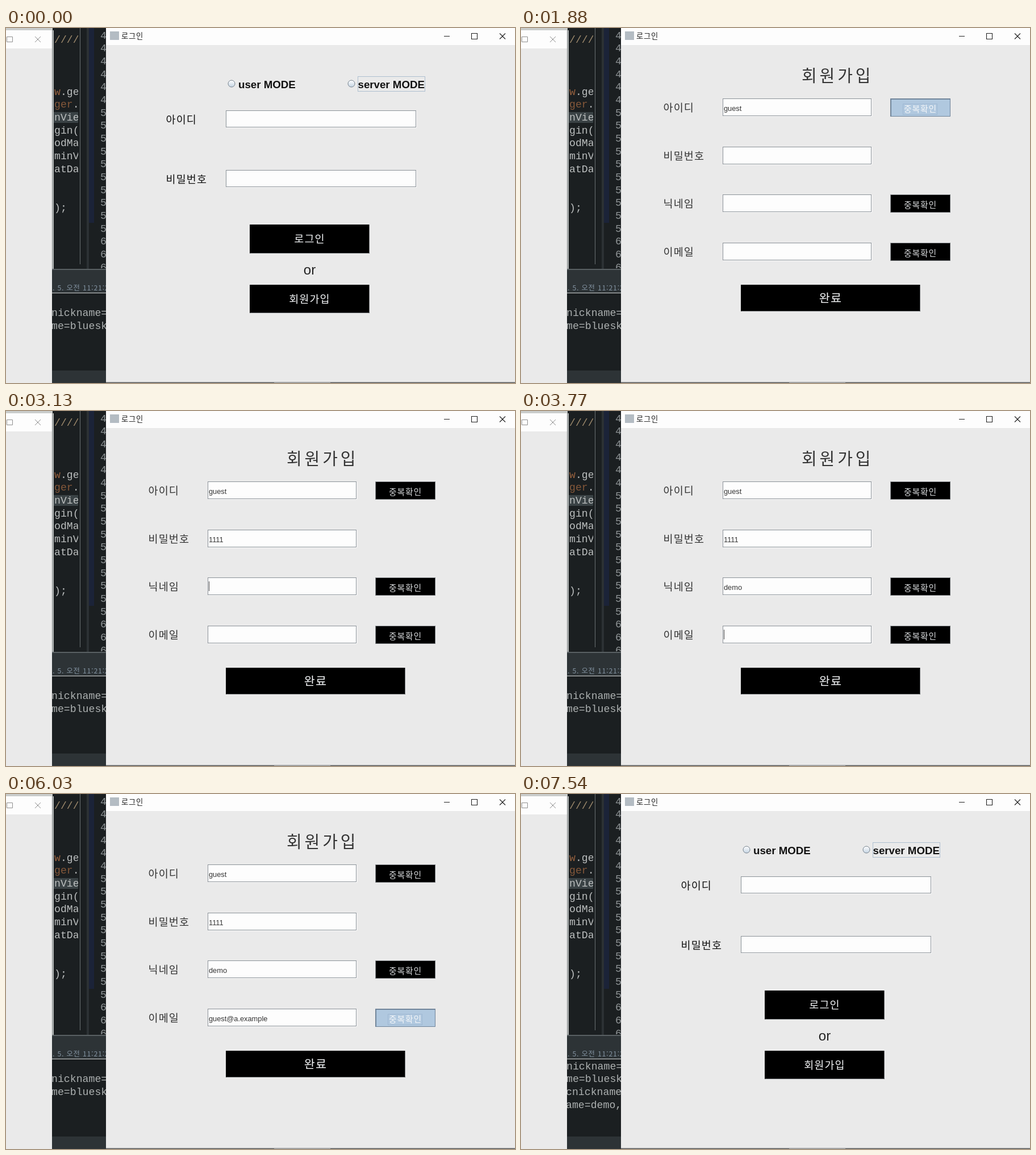
Write an HTML page that moves like this. It is 896 by 625 pixels and loops after 7730 ms.

```html
<!DOCTYPE html>
<html lang="ko">
<head>
<meta charset="utf-8">
<title>로그인</title>
<style>
  html, body { margin: 0; width: 100%; height: 100%; overflow: hidden; background: #1b1f21; }
  svg { display: block; width: 896px; height: 625px; }
  text { white-space: pre; }
  .ko { font-family: "Noto Sans CJK KR", "Noto Sans CJK", "Noto Sans CJK JP", sans-serif; letter-spacing: .06em; }
  .title { letter-spacing: .17em; }
  .sans { font-family: "Liberation Sans", sans-serif; }
  .mono { font-family: "Liberation Mono", monospace; }
</style>
</head>
<body>
<svg id="stage" viewBox="0 0 896 625" xmlns="http://www.w3.org/2000/svg">
  <defs>
    <clipPath id="codeClip"><rect x="84" y="0" width="43" height="424"/></clipPath>
    <clipPath id="numClip"><rect x="146" y="0" width="30" height="423"/></clipPath>
    <clipPath id="logClip"><rect x="81" y="425" width="95" height="200"/></clipPath>
    <linearGradient id="dot" x2="0" y2="1"><stop stop-color="#fff"/><stop offset="1" stop-color="#c3d3e2"/></linearGradient>
  </defs>
  <g id="back"></g>
  <g id="log" clip-path="url(#logClip)"></g>
  <g id="frame"></g>
  <g id="login"></g>
  <g id="join"></g>
</svg>
<script>
const LOOP = 7730;
const $ = id => document.getElementById(id);

function add(parent, tag, attrs, label) {
  const node = document.createElementNS("http://www.w3.org/2000/svg", tag);
  for (const key in attrs) node.setAttribute(key, attrs[key]);
  if (label !== undefined) node.textContent = label;
  parent.appendChild(node);
  return node;
}
const rect = (g, x, y, width, height, fill, more) => add(g, "rect", { x, y, width, height, fill, ...more });
const path = (g, d, stroke, width = 1) => add(g, "path", { d, stroke, fill: "none", "stroke-width": width });
const text = (g, x, y, label, cls, size, fill, more) =>
  add(g, "text", { x, y, class: cls, "font-size": size, fill, ...more }, label);
const show = (node, on) => node.setAttribute("visibility", on ? "inherit" : "hidden");
const mid = { "text-anchor": "middle" };
const medium = { "font-weight": 500 };

function field(g, x, y, w, h) {
  rect(g, x + 1, y + 1, w, h, "#fbfbfb");
  rect(g, x + .5, y + .5, w - 1, h - 1, "#fdfdfd", { stroke: "#8b9298" });
}

// Returns a function that sets the pressed state
function button(g, x, y, w, h, label, size, weight, baseline, edge = "#000", ink = "#f4f6f8") {
  const up = add(g, "g", {}), down = add(g, "g", {});
  const cx = x + w / 2;
  rect(up, x + .5, y + .5, w - 1, h - 1, "#000", { stroke: edge });
  path(up, `M${x + .5} ${y + h - .5}H${x + w - .5}V${y}`, "#6f7275");
  rect(down, x, y, w, h, "#b0c8df");
  path(down, `M${x + .5} ${y + .5}h${w - 1}v${h - 1}h${1 - w}z`, "#71859a");
  path(down, `M${x + 1} ${y + h}V${y + 1}H${x + w}`, "#71859a", 2);
  const half = label.length * size * .49 + 1;
  rect(down, cx - half - .5, baseline - size * .9 - .5, half * 2, size * 1.26, "none", { stroke: "#9fb8d2" });
  text(up, cx, baseline, label, "ko", size, ink, { ...mid, "font-weight": weight });
  text(down, cx, baseline, label, "ko", size, "#f4f6f8", { ...mid, "font-weight": weight });
  const press = on => { show(up, !on); show(down, on); };
  press(false);
  return press;
}

// Editor and console behind the windows
const back = $("back");
rect(back, 0, 0, 896, 625, "#1b1f21");
rect(back, 142, 0, 4, 424, "#2c3134");
rect(back, 146, 0, 9, 343, "#1b2338");
rect(back, 130, 0, 1, 416, "#6b7072");
const code = add(back, "g", { "clip-path": "url(#codeClip)" });
rect(code, 84, 148, 43, 19, "#3a4245");
[["////", 20, "#a08c6e"], ["w", 112, "#96603e"], [" .ge", 112], ["ger", 134, "#85583a"], ["   .", 134],
 ["nVie", 157], ["gin(", 180], ["odMa", 202], ["minV", 225], ["atDa", 248], [");", 316]]
  .forEach(([s, y, color = "#bcbfbf"]) => text(code, 85, y + 6, s, "mono", 18.2, color));
const nums = add(back, "g", { "clip-path": "url(#numClip)" });
for (let i = 0; i < 19; i++)
  text(nums, 166, 18.5 + i * 22.67, i < 6 ? "4" : i < 16 ? "5" : "6", "mono", 18.2, "#8f9496");
rect(back, 81, 424, 95, 2, "#596063");
rect(back, 81, 426, 95, 40, "#2d3336");
rect(back, 81, 466, 95, 1, "#d3d6d6");
rect(back, 81, 603, 95, 22, "#2d3336");
text(add(back, "g", { "clip-path": "url(#logClip)" }), 82, 462, ". 5. 오전 11:21:2", "ko", 12.4, "#8292a0");

// Console output before and after signing up
const logs = [
  [["nickname=", 80, 507], ["me=bluesk", 80, 529.5]],
  [["nickname=", 80, 484.5], ["me=bluesk", 80, 507], ["cnickname", 79, 529.5], ["ame=demo,", 79, 552.5]]
].map(lines => {
  const g = add($("log"), "g", {});
  lines.forEach(([s, x, y]) => text(g, x, y, s, "mono", 18.2, "#adb1b1"));
  return g;
});

// Window frames
const frame = $("frame");
rect(frame, 0, 0, 82, 5, "#c9cccb");
rect(frame, 0, 4, 81, 32, "#fdfdfd");
rect(frame, 0, 36, 81, 589, "#eaeaea");
rect(frame, 81, 4, 1, 420, "#84898a");
rect(frame, 82, 4, 2, 420, "#b5b9b9");
path(frame, "M1.5 15.5h10v9h-10z", "#8f8f8f");
path(frame, "M51 15l10 10m0-10l-10 10", "#8f8f8f");
rect(frame, 176, 0, 720, 30, "#fdfdfd");
rect(frame, 176, 30, 720, 594, "#eaeaea");
rect(frame, 176, 623.5, 720, 1.5, "#585b5c");
rect(frame, 472, 623.5, 99, 1.5, "#a2a4a5");
rect(frame, 183, 6, 16, 15, "#b4bcc3");
text(frame, 203, 19, "로그인", "ko", 13.3, "#222");
path(frame, "M771 14.5h10M819.5 9.5h10v10h-10zM869 9.5l10 10m0-10l-10 10", "#222", 1.1);

// Login page
const login = $("login");
for (const [cx, x, s] of [[397, 409, "user MODE"], [608, 619.5, "server MODE"]]) {
  add(login, "circle", { cx, cy: 98, r: 6, fill: "url(#dot)", stroke: "#76828d" });
  text(login, x, 106, s, "sans", 18.7, "#111", { "font-weight": 700 });
}
rect(login, 619.5, 85.5, 118, 26, "none", { stroke: "#aebfd0" });
text(login, 281.5, 167.5, "아이디", "ko", 18.5, "#111", medium);
text(login, 281.5, 272.5, "비밀번호", "ko", 18.5, "#111", medium);
field(login, 387, 145, 335, 30);
field(login, 387, 250, 335, 30);
const pressLogin = button(login, 429, 346, 211, 51, "로그인", 18.5, 500, 378);
text(login, 534.5, 434, "or", "sans", 24, "#222", mid);
button(login, 429, 452, 211, 50, "회원가입", 18.5, 500, 483.5);

// Sign-up page
const join = $("join");
text(join, 494, 95, "회원가입", "ko title", 29, "#333");
const inputs = ["아이디", "비밀번호", "닉네임", "이메일"].map((label, i) => {
  const y = Math.round(124 + i * 84.5);
  text(join, 250.5, y + 23, label, "ko", 18.5, "#333", medium);
  field(join, 355, y, 262, 31);
  const node = text(join, 357, y + 21.5, "", "sans", 12.8, "#333");
  const press = i === 1 ? () => {}
    : button(join, 650, y, 106, 32, "중복확인", 14.8, 300, y + 23.5, "#8d9094", "#d6d8da");
  return { y, node, press };
});
const pressDone = button(join, 387, 452, 316, 47, "완료", 20.7, 500, 483);
const caret = rect(join, 357, 0, 1, 17, "#444");

// Entered values, key times, and the span in which each field has the caret
const entries = [
  { value: "guest", keys: [1300, 1370, 1440, 1520, 1600], focus: [1180, 1880] },
  { value: "1111", keys: [2820, 2890, 2960, 3030], focus: [2500, 3100] },
  { value: "demo", keys: [3260, 3340, 3430, 3520], focus: [3100, 3640] },
  { value: "guest@a.example", focus: [3640, 6000],
    keys: [4200, 4280, 4360, 4440, 4520, 4980, 5130, 5280, 5420, 5560, 5720, 5780, 5920, 5945, 5970] }
];
const within = (t, a, b) => t >= a && t < b;

function draw(t) {
  const joining = within(t, 620, 7410);
  show(login, !joining);
  show(join, joining);
  show(logs[0], t < 7410);
  show(logs[1], t >= 7410);
  pressLogin(within(t, 380, 620));
  inputs[0].press(within(t, 1880, 2060));
  inputs[3].press(within(t, 6000, 6160));
  pressDone(within(t, 6970, 7410));

  let caretOn = false;
  entries.forEach(({ value, keys, focus }, i) => {
    const { node, y } = inputs[i];
    const typed = value.slice(0, keys.filter(k => k <= t).length);
    if (node.textContent !== typed) node.textContent = typed;
    if (!within(t, ...focus)) return;
    caretOn = joining && !within(t, 4760, 4980);
    caret.setAttribute("x", Math.floor(357 + (typed ? node.getComputedTextLength() : 0)));
    caret.setAttribute("y", y + 7);
  });
  show(caret, caretOn);
}

const start = performance.now();
function tick() {
  draw((performance.now() - start) % LOOP);
  requestAnimationFrame(tick);
}
tick();
</script>
</body>
</html>
```
